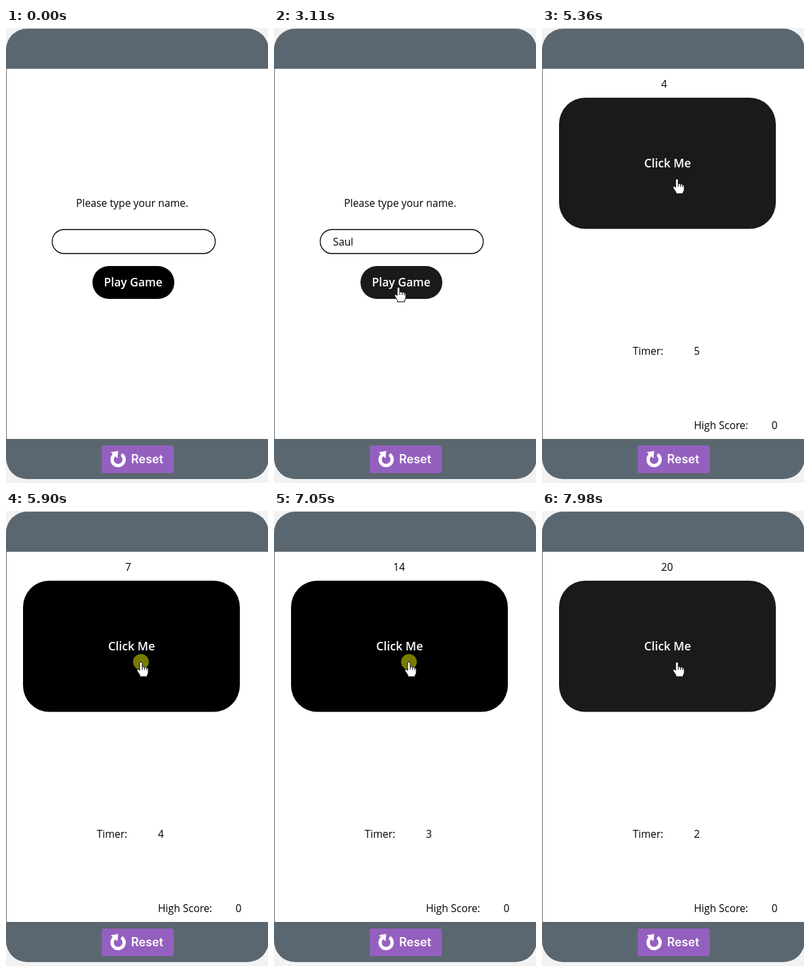
These frames come from a looping animation (400 px wide and 692 px high, 8 s). An HTML page:

```html
<!DOCTYPE html>
<html lang="en">
<head>
<meta charset="utf-8">
<title>Click game</title>
<style>
html, body { margin: 0; width: 100%; height: 100%; overflow: hidden; background: #f2f2f2; }
svg { display: block; width: 100vw; height: 100vh; }
text { font: 15.75px "Open Sans", sans-serif; fill: #000; }
.bold { font-weight: 600; fill: #fff; }
.reset { font: 600 18px Inter, sans-serif; fill: #fff; }
</style>
</head>
<body>
<svg viewBox="0 0 400 692">
  <rect y="1" width="401" height="685" rx="32" fill="#5b6770"/>
  <rect x="1" y="62" width="399" height="563" fill="#fff"/>

  <rect x="146" y="635" width="110" height="42" rx="3" fill="#9460bf"/>
  <path d="M176.2 648.6A9.2 9.2 0 1 1 165.6 649" fill="none" stroke="#fff" stroke-width="5"/>
  <path d="M160 645.2L171.3 643.2 170.2 654.6Z" fill="#fff"/>
  <text class="reset" x="191" y="662">Reset</text>

  <g id="start">
    <text x="107" y="272">Please type your name.</text>
    <rect x="70.5" y="306.5" width="249" height="36.5" rx="18.2" fill="#fff" stroke="#000" stroke-width="1.3"/>
    <text id="name" x="90" y="331"></text>
    <path id="caret" d="M0 316V334" stroke="#000"/>
    <rect id="play" x="132" y="362" width="125" height="50" rx="25"/>
    <text class="bold" x="149.5" y="393" style="font-size:17.5px">Play Game</text>
  </g>

  <g id="game">
    <text id="score" x="182" y="91"></text>
    <rect id="hit" x="26" y="106" width="331" height="199.5" rx="40"/>
    <text class="bold" x="156" y="212" style="font-size:17.8px">Click Me</text>
    <text x="138.5" y="497">Timer:</text>
    <text id="timer" x="232" y="497"></text>
    <text x="232" y="610">High Score:</text>
    <text x="350.5" y="610">0</text>
  </g>

  <g id="pointer">
    <circle id="glow" r="12" fill="#ff0" fill-opacity=".48"/>
    <path id="arrow" d="M0 0V16L3.7 12.5 6.2 18.5 8.6 17.5 6.1 11.7H11.2Z" fill="#fff" stroke="#000"/>
    <path id="beam" d="M-3-8H3M0-8V8M-3 8H3" fill="none" stroke="#000"/>
    <g id="hand" stroke="#000">
      <path fill="#fff" d="M-2 2a2 2 0 0 1 4 0V7.5q2-1 3.5.6 2-.8 3.3.8 2.4-.4 2.4 2V16q0 2-1.6 4v2.5H-1.5V20.5L-5.6 14Q-6.8 11.5-5 11-3.8 10.8-2 13Z"/>
      <path fill="none" d="M2 7.5v4.5M5.5 8.5v3.5M8.8 9.5v3"/>
    </g>
  </g>
</svg>
<script>
const LOOP = 8000, TICK = 66.5;
const GAME_AT = 3480, FIRST_CLICK = 4830, CLICK_GAP = 165, PRESS = 95, TIMER_START = 4740;
const NAME = "Saul", KEYS = [1630, 1960, 2090, 2230];
const el = {};
document.querySelectorAll("[id]").forEach(e => el[e.id] = e);

// Pointer route: time, x, y
const route = [
  [250, 349, 628], [400, 262, 500], [580, 183, 334],
  [760, 183, 334], [980, 366, 350],
  [2730, 366, 350], [2900, 287, 395], [3000, 222, 407], [3110, 190, 394],
  [4060, 190, 394], [4370, 204.5, 227.5],
  [4670, 204.5, 227.5], [4730, 206, 229.5]
];

function pointerAt(t) {
  const i = route.findIndex(p => p[0] > t);
  if (i < 0) return route[route.length - 1].slice(1);
  if (i === 0) return route[0].slice(1);
  const [a, b] = [route[i - 1], route[i]];
  const f = (t - a[0]) / (b[0] - a[0]);
  return [a[1] + (b[1] - a[1]) * f, a[2] + (b[2] - a[2]) * f];
}

const between = (t, a, b) => t >= a && t < b;
const inside = (x, y, l, top, r, bottom) => x > l && x < r && y > top && y < bottom;
const show = (e, on) => e.setAttribute("display", on ? "inline" : "none");
const setText = (e, s) => { if (e.textContent !== String(s)) e.textContent = s; };

function capture(t) {
  return t < 240 ? 0 : 250 + TICK * Math.floor((t - 250) / TICK + 0.2) + 20;
}

function gamePressed(t) {
  const phase = t - (FIRST_CLICK - PRESS);
  return phase >= 0 && phase % CLICK_GAP < PRESS;
}

function render(now) {
  const t = capture(now % LOOP);
  const inGame = t >= GAME_AT;
  const [x, y] = pointerAt(t);
  const overPlay = !inGame && t > 0 && inside(x, y, 132, 362, 257, 412);
  const overHit = inGame && inside(x, y, 26, 106, 357, 305);
  const overInput = !inGame && inside(x, y, 70, 306, 320, 343);
  const pressed = between(t, 720, 790) || between(t, 3300, 3440) || gamePressed(t);
  const shade = over => over && !pressed ? "#1a1a1a" : "#000";

  show(el.start, !inGame);
  show(el.game, inGame);
  el.play.setAttribute("fill", shade(overPlay));
  el.hit.setAttribute("fill", shade(overHit));

  setText(el.name, NAME.slice(0, KEYS.filter(k => t >= k).length));
  show(el.caret, between(t, 720, 1310) || between(t, KEYS[0], 2765));
  const typed = el.name.textContent ? el.name.getComputedTextLength() : 0;
  el.caret.setAttribute("transform", `translate(${Math.round(90 + typed) + 0.5})`);

  setText(el.score, Math.max(0, Math.floor((t - FIRST_CLICK) / CLICK_GAP) + 1));
  setText(el.timer, 5 - Math.max(0, Math.floor((t - TIMER_START) / 1000)));

  show(el.pointer, t > 0);
  el.pointer.setAttribute("transform", `translate(${x} ${y})`);
  show(el.glow, pressed);
  show(el.hand, overPlay || overHit);
  show(el.beam, overInput);
  show(el.arrow, !overPlay && !overHit && !overInput);
}

const begin = performance.now();
function frame() {
  render(performance.now() - begin);
  requestAnimationFrame(frame);
}
frame();
</script>
</body>
</html>
```
